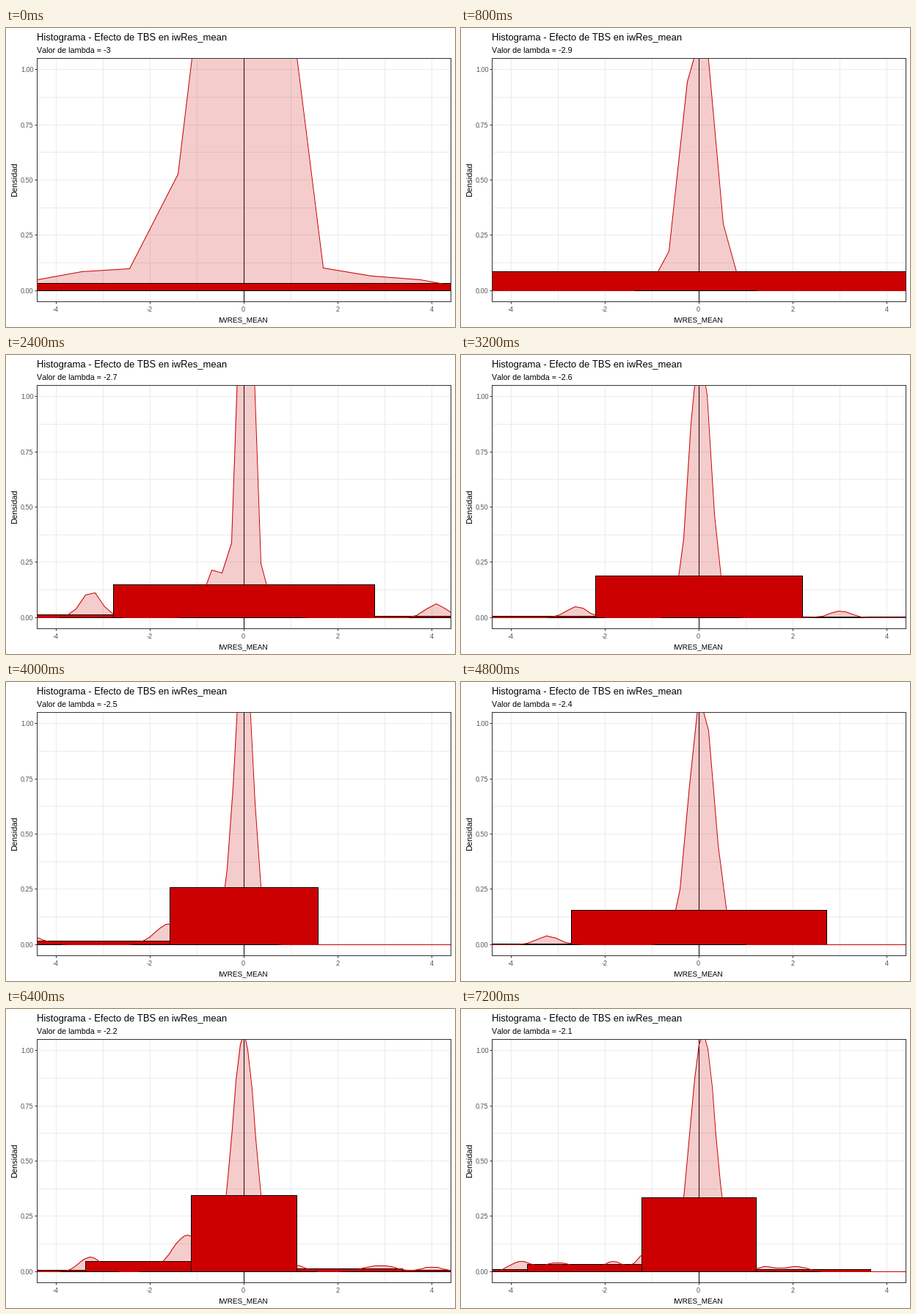
Write a matplotlib script that moves like this. It is 612 by 408 pixels and loops after 8000 ms.

```python
import numpy as np
import matplotlib.pyplot as plt
from matplotlib.animation import ArtistAnimation
from matplotlib.patches import Rectangle

W, H, DPI = 612, 408, 72  # at 72 dpi one point is one pixel
RED, DARK, GRID, GREY = "#CC0000", "#333333", "#EBEBEB", "#4D4D4D"
LEFT, RIGHT, TOP, BOTTOM = 42, 606, 41, 373  # panel edges in pixels
SPREAD = 0.22  # usual width of the small side humps

plt.rcParams.update({
    "font.family": "Liberation Sans",
    "text.hinting": "native",
    "text.kerning_factor": 6,
})

fig = plt.figure(figsize=(W / DPI, H / DPI), dpi=DPI, facecolor="white")
ax = fig.add_axes([LEFT / W, 1 - BOTTOM / H, (RIGHT - LEFT) / W, (BOTTOM - TOP) / H])
ax.set_xlim(-4.4, 4.4)
ax.set_ylim(-0.05, 1.05)
ax.set_autoscale_on(False)


def label(x, y, text, size, color="black", **kw):
    """Text with its baseline at pixel (x, y), counted from the top left."""
    return fig.text(x / W, 1 - y / H, text, fontsize=size, color=color,
                    va="baseline", **kw)


def px(x):
    return LEFT + (x + 4.4) / 8.8 * (RIGHT - LEFT)


def py(y):
    return BOTTOM - (y + 0.05) / 1.1 * (BOTTOM - TOP)


def draw_panel():
    xticks, yticks = np.arange(-4, 5, 2), np.arange(0, 1.1, 0.25)
    for x in range(-4, 5):
        ax.axvline(x, color=GRID, lw=1, zorder=0.5)
    for y in np.arange(0, 1.01, 0.125):
        ax.axhline(y, color=GRID, lw=1, zorder=0.5)
    ax.axvline(0, color="black", lw=1, zorder=1)

    ax.set_xticks(xticks)
    ax.set_yticks(yticks)
    ax.tick_params(length=3, width=1, color=DARK, labelbottom=False, labelleft=False)
    for spine in ax.spines.values():
        spine.set(color=DARK, linewidth=1, zorder=6)

    for x in xticks:
        label(px(x) - 0.5, 387, f"{x}", 9, GREY, ha="center")
    for y in yticks:
        label(37.5, py(y) + 4, f"{y:.2f}", 9, GREY, ha="right")
    label(42, 17, "Histograma - Efecto de TBS en iwRes_mean", 12.95)
    label(323.2, 401, "IWRES_MEAN", 10, ha="center")
    label(15.5, 207, "Densidad", 11, ha="center", rotation=90, rotation_mode="anchor")


def density(x, humps):
    """Sum of bell curves given as (centre, height[, spread])."""
    total = np.zeros_like(x)
    for centre, height, *spread in humps:
        s = spread[0] if spread else SPREAD
        total += height * np.exp(-((x - centre) / s) ** 2 / 2)
    return total


def draw_state(value, width, top, phase, humps):
    artists = [label(42, 34, f"Valor de lambda = {value:g}", 10.75)]

    # Outer bars take the mean density of their bin.
    for k in range(-2, 3):
        x0 = (k - 0.5) * width
        h = density(np.linspace(x0, x0 + width, 400), humps).mean() if k else top
        bar = Rectangle((x0, 0), width, h, fc=RED, ec="black", lw=1, zorder=2,
                        antialiased=False)
        artists.append(ax.add_patch(bar))

    # The curve is sampled on a grid that coarsens with the data range.
    step = 0.0374 * width
    n = int(5 / step) + 1
    x = phase + step * np.arange(-n, n + 1)
    y = density(x, humps)
    artists.append(ax.fill_between(x, y, color=RED, alpha=0.2, lw=0, zorder=3))
    artists += ax.plot(x, y, color=RED, lw=1, zorder=4, snap=True)
    return artists


# One row per lambda: bin width, central bar height, grid phase, humps
STATES = [
    (27.5, 0.034, -0.37, [(0.063, 3, 0.6), (-1.4, 0.3), (-2.6, 0.1, 1.5), (3, 0.07, 0.9)]),
    (10.2, 0.086, 0.13, [(0, 1.35, 0.295), (-0.75, 0.05)]),
    (7, 0.118, 0, [(0.02, 1.35, 0.26), (-0.9, 0.1)]),
    (5.54, 0.149, -0.058, [(0.036, 1.98, 0.15), (-0.6, 0.23), (0.6, 0.08),
                           (-3.25, 0.12), (4.08, 0.062)]),
    (4.4, 0.19, 0, [(0.02, 1.25, 0.22), (-2.6, 0.05), (3, 0.03)]),
    (3.16, 0.258, 0, [(-0.005, 1.32, 0.2), (-0.5, 0.07), (-1.58, 0.095, 0.3),
                      (-4.6, 0.04, 0.3)]),
    (5.42, 0.155, 0, [(0.05, 1.15, 0.26), (-3.2, 0.04)]),
    (4.7, 0.189, -0.023, [(0.14, 1.08, 0.277), (-0.5, 0.045), (-3.42, 0.03),
                          (-2.72, 0.047), (4.45, 0.046)]),
    (2.25, 0.343, 0, [(-0.008, 1.08, 0.24), (-1.2, 0.165, 0.33), (-3.27, 0.067),
                      (1.05, 0.03), (2.9, 0.028, 0.33), (4, 0.021)]),
    (2.435, 0.335, 0, [(0.083, 1.08, 0.265), (-3.8, 0.045), (-3, 0.04, 0.33),
                       (-1.83, 0.046), (-1.05, 0.1), (1.42, 0.022), (2.07, 0.024)]),
]

draw_panel()
frames = [draw_state(-3 + 0.1 * i, *state) for i, state in enumerate(STATES)]
anim = ArtistAnimation(fig, frames, interval=800, repeat=True, repeat_delay=0)
plt.show()
```
